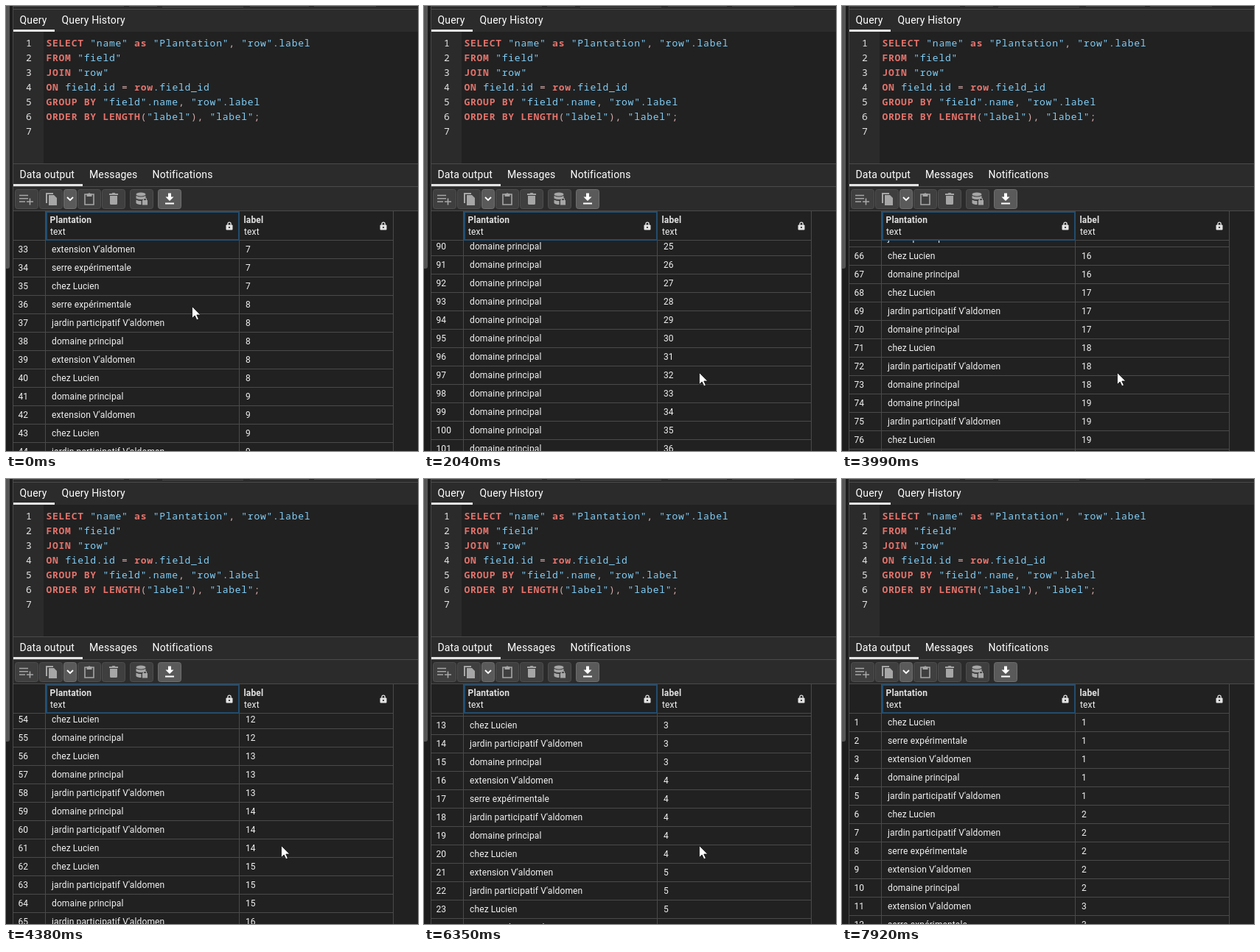
Write an HTML page that moves like this. It is 559 px wide and 605 px high and loops after 8770 ms.

```html
<!DOCTYPE html>
<html lang="fr">
<head>
<meta charset="utf-8">
<title>Query</title>
<style>
html, body { margin: 0; width: 100%; height: 100%; overflow: hidden; background: #212121; }
svg { display: block; }
text { font-family: Roboto, sans-serif; fill: #fff; white-space: pre; }
.tab { font-size: 14px; letter-spacing: .15px; }
.cell, .head { font-size: 12px; letter-spacing: .13px; fill: #f2f2f2; }
.bold { font-weight: 700; fill: #e0e0e0; }
.code text { font: 13px "Noto Sans Mono", monospace; letter-spacing: .74px; fill: #80cff8; }
.code .num { fill: #e4e4e4; }
.code .key { fill: #e4736c; font-weight: 700; }
.code .sym { fill: #d6aaaa; }
.line { stroke: #4a4a4a; fill: none; }
.button { fill: #3f3f3f; stroke: #4e4e4e; }
.button.on { fill: #5a5a5a; stroke: #6e6e6e; }
.icon { fill: none; stroke: #a6a6a6; stroke-width: 1.6; }
.solid { fill: #a6a6a6; stroke: none; }
</style>
</head>
<body>
<svg width="559" height="605" viewBox="0 0 559 605">
  <defs>
    <clipPath id="body"><rect x="9" y="319" width="517" height="286"/></clipPath>
    <g id="lock">
      <path d="M2.4 5V3.3a2.1 2.1 0 0 1 4.2 0V5" fill="none" stroke="#e4e4e4" stroke-width="1.3"/>
      <rect y="4.6" width="9" height="7" rx="1" fill="#e4e4e4"/>
      <circle cx="4.5" cy="8" r="1.1" fill="#212121"/>
    </g>
  </defs>
  <rect width="559" height="605" fill="#212121"/>

  <!-- left scrollbar -->
  <rect width="9" height="605" fill="#1d1d1d"/>
  <rect x="-4" y="-8" width="9" height="365" rx="3" fill="#555"/>

  <!-- query panel -->
  <rect x="9" width="550" height="35" fill="#2b2b2b"/>
  <path class="line" d="M10 .5H160M167 .5H205M212 1.5H322M331 .5H411M418 .5H502M9 4.5H559"/>
  <rect x="10" y="32" width="56" height="3" fill="#e4e4e4"/>
  <text class="tab" x="18.5" y="24">Query</text>
  <text class="tab" x="75.5" y="24">Query History</text>
  <rect x="10" y="35" width="41" height="179" fill="#2b2b2b"/>
  <g class="code" id="code"></g>

  <!-- output panel -->
  <rect x="9" y="214" width="550" height="65" fill="#2b2b2b"/>
  <path class="line" d="M9 214.5H559M9 245.5H559M9 278.5H559"/>
  <rect x="10" y="242" width="94" height="3" fill="#e4e4e4"/>
  <text class="tab" x="18.5" y="234">Data output</text>
  <text class="tab" x="113" y="234">Messages</text>
  <text class="tab" x="198.5" y="234">Notifications</text>

  <g id="buttons"></g>
  <g class="icon">
    <path d="M18 257.5H30M18 261.8H30M18 266H26M28 266H37M32.5 261.5V270.5"/>
    <path class="solid" d="M54 254h10v2h-8v12h-2zM58 257h7l4 4v10h-11z"/>
    <path d="M83 260l4 4 4-4" stroke="#fff" stroke-width="1.8"/>
    <path d="M107 256h12v14h-12z"/>
    <path class="solid" d="M109.5 255h2a1.8 1.8 0 0 1 3 0h2v4h-7z"/>
    <path class="solid" d="M140 255h3.500l1-1h3l1 1h3.500v2h-12zM141 258h10v10.500a1.500 1.500 0 0 1-1.500 1.500h-7a1.500 1.500 0 0 1-1.500-1.500z"/>
    <ellipse class="solid" cx="183" cy="256" rx="6.5" ry="2.5"/>
    <path class="solid" d="M176.5 258q6.500 3 13 0v3.500q-6.500 3-13 0zM176.5 263.500q4 2 7 1.500v5q-5 0-7-2zM185 264h7v6.500h-7z"/>
    <path d="M186.5 264v-1a2 2 0 0 1 4 0v1" stroke-width="1.2"/>
    <path class="solid" style="fill:#fff" d="M220 254.500h4v5h3.500l-5.500 5.500-5.500-5.500h3.500zM216 267.500h12v2h-12z"/>
  </g>

  <!-- grid -->
  <g clip-path="url(#body)"><g id="rows"></g></g>
  <path class="line" d="M9.5 0V605M53.5 279V605M316.5 279V605M525.5 279V605M9 318.500H526"/>
  <rect x="55" y="280" width="261" height="38" fill="none" stroke="#234d6e" stroke-width="2"/>
  <text class="head bold" x="59.5" y="295">Plantation</text>
  <text class="head" x="60" y="311">text</text>
  <text class="head bold" x="322.5" y="295">label</text>
  <text class="head" x="323" y="311">text</text>
  <use href="#lock" x="298.5" y="293"/>
  <use href="#lock" x="507.5" y="293"/>

  <path id="cursor" d="M.5 .5V16.500L4.200 13 6.900 18.700 9.400 17.600 6.800 12H11.800Z" fill="#fff" stroke="#111" stroke-width=".8"/>
</svg>
<script>
const LOOP = 8770, ROW = 25;
const NS = 'http://www.w3.org/2000/svg';
const $ = id => document.getElementById(id);

function add(parent, tag, attrs, text) {
  const el = document.createElementNS(NS, tag);
  for (const k in attrs) el.setAttribute(k, attrs[k]);
  if (text !== undefined) el.textContent = text;
  return parent.appendChild(el);
}

// SQL editor
const sql = `SELECT "name" as "Plantation", "row".label
FROM "field"
JOIN "row"
ON field.id = row.field_id
GROUP BY "field".name, "row".label
ORDER BY LENGTH("label"), "label";
`;
const token = /"\w+"|[=(),;]|\w+|[\s.]+/g;
const kind = t => /^([A-Z]+|as|row)$/.test(t) ? 'key' : /^[=(),;]$/.test(t) ? 'sym' : '';
sql.split('\n').forEach((src, i) => {
  const y = 55 + 20 * i;
  add($('code'), 'text', { class: 'num', x: 27, y }, i + 1);
  const line = add($('code'), 'text', { x: 54.5, y });
  for (const t of src.match(token) || []) add(line, 'tspan', { class: kind(t) }, t);
});

// Toolbar
function button(x, on = '', width = 31) {
  add($('buttons'), 'rect', { class: 'button ' + on, x: x + .5, y: 249.5, width, height: 26, rx: 3 });
}
[12, 45, 97, 130, 168].forEach(x => button(x));
button(78, 'on', 17);
button(206, 'on');

// Table rows: the n-th group holds the places that have label n
const places = {
  c: 'chez Lucien', s: 'serre expérimentale', e: "extension V'aldomen",
  d: 'domaine principal', j: "jardin participatif V'aldomen"
};
const groups = ('csedj cjsed escjd esjdc ejcsd djesc djesc sjdec decjs dejc cjd jcd cdj djc cjd ' +
  'jcd cjd cjd djc djc cdj jcd cd dc' + ' d'.repeat(12)).split(' ');
const cells = groups.flatMap((group, i) => [...group].map(key => [places[key], i + 1]));
cells.forEach(([place, label], i) => {
  const top = 319 + ROW * i, y = top + 16;
  const put = (x, s) => add($('rows'), 'text', { class: 'cell', x, y }, s);
  add($('rows'), 'path', { class: 'line', d: `M9 ${top + 24.5}H526` });
  put(16.5, i + 1);
  put(62, place);
  put(325, label);
});

// Motion is seen in coarse ticks: whole ticks passed since a start
const ticks = (t, start, period) => Math.floor((t - start) / period);
const smooth = p => p * p * (3 - 2 * p);

// Wheel turns; each is an eighth under way when first seen
const TICK = 123, HOME = 800;
const turns = [
  { start: 290, time: 481, to: 2229 },
  { start: 2210, time: 500, to: 1929 },
  { start: 3170, time: 430, to: 1629 },
  { start: 3990, time: 430, to: 1329 },
  { start: 4940, time: 519, to: 429 },
  { start: 6200, time: 365, to: 129 },
  { start: 7180, time: 140, to: 0 }
];
function scrollAt(t) {
  let y = HOME;
  for (const { start, time, to } of turns) {
    if (t < start) break;
    const p = Math.min(1, 1 / 8 + ticks(t, start, TICK) * TICK / time);
    y += (to - y) * smooth(p);
  }
  return Math.round(y);
}

// Pointer: glides to a rest, then speeds out of view
function pointerAt(t) {
  if (t >= 7610) {
    const k = 1 + ticks(t, 7610, 150);
    return [373 + 23 * k * k, 498 + 20 * k * k];
  }
  const left = 1 - Math.min(7, Math.max(0, 1 + ticks(t, 1210, 138))) / 7;
  return [373 - 121 * left ** 5, 498 - 90 * left ** 3].map(Math.round);
}

const begin = performance.now();
function draw() {
  const t = Math.max(0, performance.now() - begin) % LOOP;
  $('rows').setAttribute('transform', `translate(0 ${-scrollAt(t)})`);
  $('cursor').setAttribute('transform', `translate(${pointerAt(t)})`);
  requestAnimationFrame(draw);
}
draw();
</script>
</body>
</html>
```
